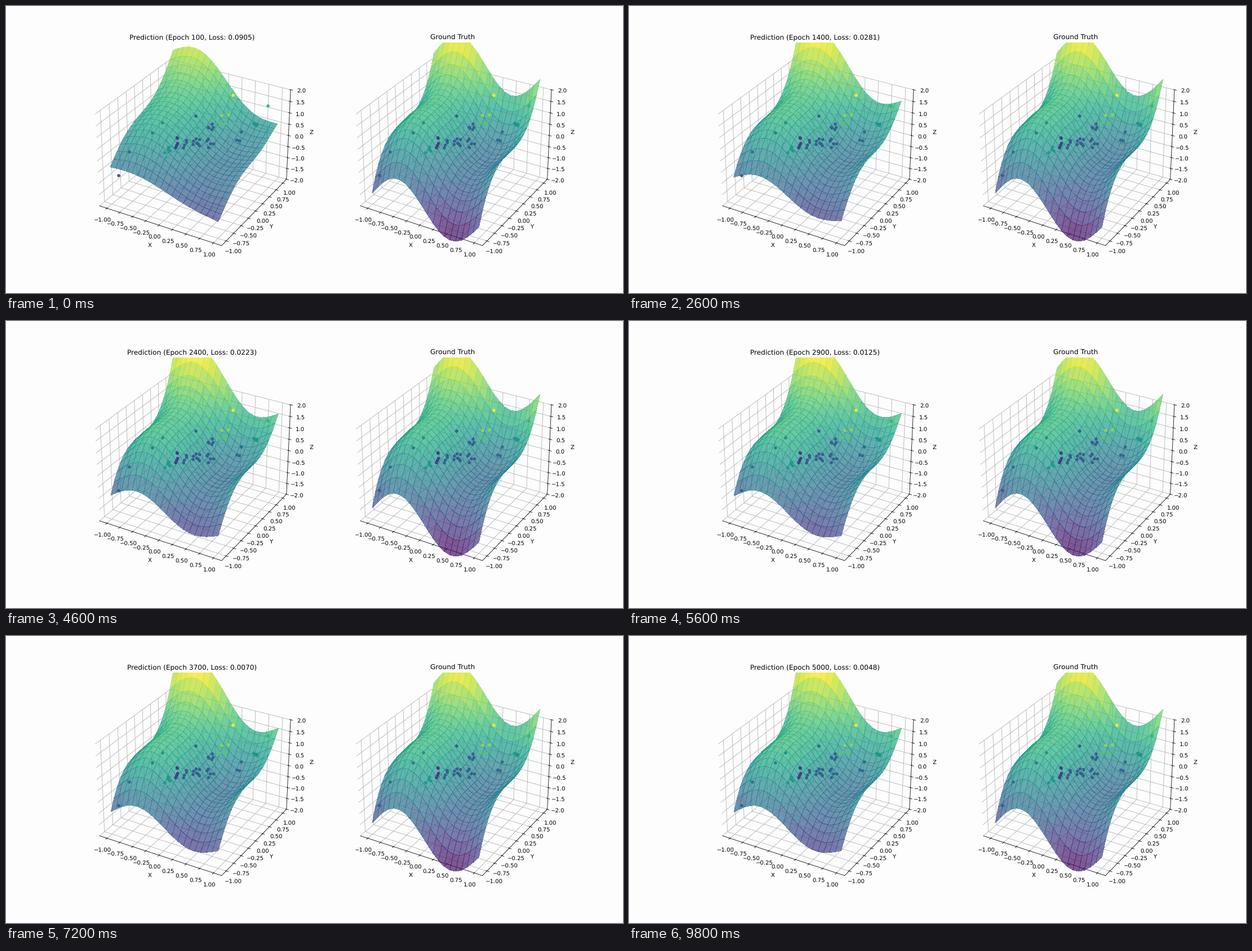
Animation, 1095 px wide and 511 px high, one loop 10000 ms. Source, as a matplotlib script:

```python
import numpy as np
import matplotlib.pyplot as plt
from matplotlib.animation import FuncAnimation

FRAMES, INTERVAL = 50, 200
PAPER = "#fdfdfd"
LIM = 1.1 * 25 / 24
STYLE = dict(cmap="viridis", alpha=0.7, vmin=-2.5, vmax=3.5, zorder=1,
             linewidth=0, antialiased=False)
plt.rcParams["text.hinting"] = "none"

axis = np.linspace(-1, 1, 20)
X, Y = np.meshgrid(axis, axis)
WAVE = -np.sin(np.pi * X)
TRUTH = 2 * Y**3 + WAVE + 0.5

# Epoch step and loss
LOSS = {0: 0.0905, 6: 0.0398, 13: 0.0281, 23: 0.0223,
        28: 0.0125, 36: 0.0070, 49: 0.0048}

# Stage position and place on the colour map of single samples
SINGLES = [(403, 159, 1.0), (465, 178, 0.66), (383, 195, 0.83),
           (395, 194, 0.83), (379, 208, 0.74), (390, 209, 0.74),
           (340, 217, 0.66), (337, 196, 0.3), (278, 208, 0.5),
           (260, 226, 0.42), (219, 260, 0.36), (200, 302, 0.3)]
# Clouds of samples: centre, half width, half height, count, colour
CLOUDS = [(345, 244, 30, 9, 16, 0.3), (363, 214, 7, 7, 5, 0.32),
          (411, 233, 9, 11, 3, 0.34), (440, 214, 7, 7, 4, 0.52),
          (287, 257, 8, 9, 4, 0.54), (300, 242, 5, 11, 5, 0.18)]


def ease(frame, span):
    return 1 - np.exp(-frame / span)


def border(start, end, progress):
    """Height along x: level, slope, bend and wave share, eased in time."""
    a, b, c, d = np.array(start) + progress * np.subtract(end, start)
    return a + b * X + c * X**2 + d * WAVE


def predict(frame):
    """Blend of the near and far borders that bends towards the truth."""
    fast, slow = ease(frame, 6), ease(frame, 12)
    near = border((-0.65, -0.46, -0.15, 0.12), (-0.95, -0.10, -0.17, 0.55), slow)
    far = border((1.96, -1.02, -0.36, 0.54), (2.60, -0.63, -0.27, 0.85), fast)
    cubic = Y**3 + 0.55 * (1 - slow) * (Y - Y**3)
    fit = near + (far - near) * (1 + cubic) / 2
    return fit + (0.3 + 0.5 * slow) * (1 - Y**2) * (TRUTH - fit)


def make_samples():
    rng = np.random.default_rng(3)
    rows = list(SINGLES)
    for x, y, dx, dy, count, hue in CLOUDS:
        for sx, sy in rng.uniform(-1, 1, (count, 2)):
            rows.append((x + dx * sx, y + dy * sy, hue))
    return np.array(rows).T


def on_view_plane(px, py):
    """Data coordinates on the plane through the box centre facing the viewer."""
    u, v = (px - 334.96) / 208.51, (252.84 - py) / 208.51
    r = np.sqrt(3) / 2
    world = np.outer(u, [r, 0.5, 0]) + np.outer(v, [-0.25, r / 2, r])
    return (world / [0.51948, 0.51948, 0.22321]).T


def fix_limits(ax):
    ax.set_xlim(-LIM, LIM)
    ax.set_ylim(-LIM, LIM)
    ax.set_zlim(-2, 2)


def make_axes(fig, slot, samples):
    ax = fig.add_subplot(1, 2, slot, projection="3d", computed_zorder=False)
    ax.set_facecolor(PAPER)
    for a in (ax.xaxis, ax.yaxis, ax.zaxis):
        a.set_pane_color((1, 1, 1, 0))
    px, py, hue = samples
    ax.scatter(*on_view_plane(px, py), color=plt.cm.viridis(hue),
               depthshade=False, zorder=3)
    ax.set(xlabel="X", ylabel="Y", zlabel="Z")
    ax.set_xticks(np.arange(-1, 1.1, 0.25))
    ax.set_yticks(np.arange(-1, 1.1, 0.25))
    ax.set_zticks(np.arange(-2, 2.1, 0.5))
    return ax


fig = plt.figure(figsize=(15, 7), dpi=73, facecolor=PAPER)
samples = make_samples()
ax_fit, ax_true = (make_axes(fig, slot, samples) for slot in (1, 2))
ax_true.plot_surface(X, Y, TRUTH, **STYLE)
ax_true.set_title("Ground Truth")
fix_limits(ax_true)
shown = []


def update(frame):
    while shown:
        shown.pop().remove()
    shown.append(ax_fit.plot_surface(X, Y, predict(frame), **STYLE))
    fix_limits(ax_fit)
    loss = np.exp(np.interp(frame, list(LOSS), np.log(list(LOSS.values()))))
    ax_fit.set_title(
        f"Prediction (Epoch {100 * (frame + 1)}, Loss: {loss:.4f})")
    return shown


anim = FuncAnimation(fig, update, frames=FRAMES, interval=INTERVAL,
                     init_func=lambda: update(0), repeat=True, repeat_delay=0)
plt.show()
```
